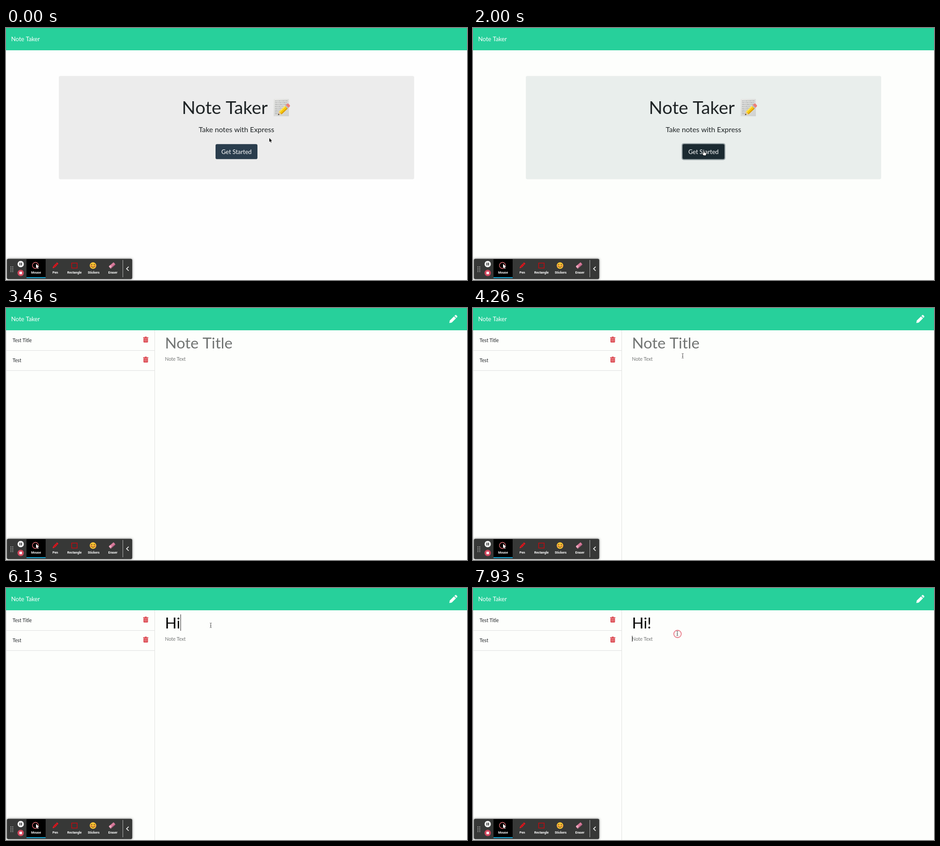
Write an HTML page with a canvas that moves like this. It is 1012x554 px and loops after 8000 ms.

```html
<!DOCTYPE html>
<html lang="en">
<head>
<meta charset="utf-8">
<title>Note Taker</title>
<style>
html, body { margin: 0; width: 100%; height: 100%; overflow: hidden; background: #fdfefc; }
canvas { display: block; }
</style>
</head>
<body>
<canvas id="stage" width="1012" height="554"></canvas>
<script>
const ctx = document.getElementById('stage').getContext('2d');
const LOOP = 8000;
const SCALE = 1012 / 1440; // page is laid out 1440 px wide
const LATO = 'Lato, sans-serif';
const TIME = { sharp: 200, hover: 400, open: 2200, focusTitle: 4900, focusText: 7900 };
const CLICKS = [
  { at: 476, x: 507.5, y: 271 },
  { at: 4848, x: 450, y: 82 },
  { at: 7866, x: 449, y: 101 }
];
const TYPED = [[5560, 'H'], [5850, 'Hi'], [6420, 'Hi!']];

const ease = p => { p = Math.max(0, Math.min(1, p)); return p * p * (3 - 2 * p); };
const mix = (a, b, p) => a + (b - a) * p;

function rect(x, y, w, h, color) {
  ctx.fillStyle = color;
  ctx.fillRect(x, y, w, h);
}
function box(x, y, w, h, r, color) {
  ctx.beginPath();
  ctx.roundRect(x, y, w, h, r);
  ctx.fillStyle = color;
  ctx.fill();
}
function disc(x, y, r, color) {
  ctx.beginPath();
  ctx.arc(x, y, r, 0, Math.PI * 2);
  ctx.fillStyle = color;
  ctx.fill();
}
function ring(x, y, r, color, width) {
  ctx.beginPath();
  ctx.arc(x, y, r, 0, Math.PI * 2);
  ctx.strokeStyle = color;
  ctx.lineWidth = width;
  ctx.stroke();
}
function shape(path, fill, stroke, width = 1) {
  const p = new Path2D(path);
  if (stroke) {
    ctx.strokeStyle = stroke;
    ctx.lineWidth = width;
    ctx.stroke(p);
  }
  if (fill) {
    ctx.fillStyle = fill;
    ctx.fill(p);
  }
}
function label(text, x, y, size, color, align = 'left', font = LATO) {
  ctx.font = `${size}px ${font}`;
  ctx.textAlign = align;
  ctx.fillStyle = color;
  ctx.fillText(text, x, y);
}
function at(x, y, draw, angle = 0) {
  ctx.save();
  ctx.translate(x, y);
  ctx.rotate(angle);
  draw();
  ctx.restore();
}

function memo() {
  const paper = ctx.createLinearGradient(588, 156, 621, 194);
  paper.addColorStop(0, '#e6e6e4');
  paper.addColorStop(1, '#cfd1d0');
  rect(587.5, 156, 33.5, 38, paper);
  ctx.strokeStyle = '#8b8d8d';
  ctx.lineWidth = 0.9;
  for (let i = 0; i < 8; i++) {
    ctx.setLineDash([4 + i % 3, 1, 2, 1]);
    ctx.beginPath();
    ctx.moveTo(590.5, 160.5 + i * 4);
    ctx.lineTo(i < 3 ? 618 : 615 - i * 2, 160 + i * 4);
    ctx.stroke();
  }
  ctx.setLineDash([]);
  at(597, 191.5, () => {
    shape('M0 0L7 -4.2L7 4.2Z', '#e8c69a');
    shape('M0 0L3 -1.8L3 1.8Z', '#333');
    rect(7, -4.2, 19, 8.4, '#f6c90e');
    rect(7, -4.2, 19, 2.5, '#ffe45c');
    rect(7, 2, 19, 2.2, '#d99a08');
    rect(25, -4.2, 3, 8.4, '#b9bcbd');
    box(28, -4.2, 6, 8.4, [0, 3, 3, 0], '#ee7f78');
  }, -0.76);
}

function header() {
  rect(0, 0, 1012, 49, '#27d09b');
  label('Note Taker', 11.25, 29, 18.75 * SCALE, '#fff');
}

function homePage(t) {
  const sharp = t >= TIME.sharp;
  const hover = t >= TIME.hover;
  box(116, 105.5, 780, 227, 3.4, sharp ? '#e9eeec' : '#ececec');
  label('Note Taker', 386, 188.6, 56 * SCALE, '#1f2426');
  memo();
  label('Take notes with Express', 506, 229.3, 22.5 * SCALE, '#1f2426', 'center');
  if (t >= 860) box(457.8, 253.2, 96.4, 37.3, 4.8, '#9ba6a9');
  box(460, 255.3, 92, 33, 3.4, hover ? '#1b2a31' : '#2a3d4d');
  label('Get Started', 506, 276.6, 18.75 * SCALE, '#fff', 'center');
}

function trash(y) {
  at(301, y, () => {
    rect(0, 1.4, 11.5, 1.7, '#d8353f');
    rect(3.6, 0, 4.3, 1.6, '#d8353f');
    box(0.9, 3.7, 9.7, 9, [0, 0, 1.3, 1.3], '#d8353f');
    for (const x of [2.9, 5.35, 7.8]) rect(x, 5, 0.8, 6.2, '#f9d9d8');
  });
}

function caret(x, y, h, since, t) {
  if ((t - since) % 1000 < 500) rect(x, y, 1, h, '#222');
}

function notesPage(t) {
  shape('M973.3 32.3L974.2 27.6L983.4 18.4L987.8 22.8L978.6 32L973.3 32.9Z', '#fff');
  shape('M984.5 17.3L986.2 15.6Q987.2 14.8 988.2 15.6L990.4 17.8Q991.4 18.9 990.4 20L988.8 21.7Z', '#fff');
  const line = '#dfe0df';
  rect(0, 49, 1, 505, line);
  rect(326, 49, 1, 505, line);
  ['Test Title', 'Test'].forEach((title, i) => {
    const y = 49 + i * 44;
    label(title, 14.6, y + 26, 15 * SCALE, '#1c2023');
    trash(y + 14);
    rect(0, y + 44, 327, 1, line);
  });

  const last = TYPED.filter(([start]) => t >= start).pop();
  const title = last ? last[1] : '';
  label(title || 'Note Title', 349, 88.7, 48 * SCALE, title ? '#000' : '#717473');
  const titleWidth = title ? ctx.measureText(title).width : 0;
  label('Note Text', 349, 115.8, 15 * SCALE, '#717473');
  if (t >= TIME.focusText) caret(349, 105, 13, TIME.focusText, t);
  else if (t >= TIME.focusTitle) {
    caret(349 + Math.round(titleWidth), 58, 36, last ? last[0] : TIME.focusTitle, t);
  }
}

const ARROW = 'M0 0L0 8.6L2 6.8L3.4 9.8L4.8 9.2L3.4 6.2L6 6Z';
function arrow(x, y) {
  at(x, y, () => shape(ARROW, '#111', '#fff', 1));
}
function hand(x, y) {
  at(x, y, () => shape(
    'M-1.5 -4Q-.6 -5 .2 -4L.2 -1.3L3.4 -.6Q4.4 0 4.1 1.5L3.4 5L-1.2 5L-4 1.2Q-3.6 -.2 -1.5 1Z',
    '#fff', '#111', 1.5));
}
function beam(x, y) {
  at(x, y, () => shape('M-2 -5L-.6 -5L0 -4.3L.6 -5L2 -5M0 -4.3L0 4.3M-2 5L-.6 5L0 4.3L.6 5L2 5M-1.2 1L1.2 1',
    null, '#444', 0.9));
}

function pointer(t) {
  if (t < TIME.open) {
    const p = ease((t - 30) / 400);
    const x = mix(578, 506, p), y = mix(242, 275, p);
    (t < TIME.hover ? arrow : hand)(t < TIME.hover ? x : 507.5, y);
  } else if (t >= 3700) {
    const p = ease((t - 3700) / 800);
    const down = ease((t - 7150) / 450);
    beam(mix(500, 449.5, p) - down, mix(190, 82, p) + 18 * down);
  }
}

function clickRings(t) {
  for (const c of CLICKS) {
    const age = t - c.at;
    if (age < 0 || age > 290) continue;
    const r = age / 8;
    const fade = Math.min(1, (290 - age) / 90);
    ring(c.x, c.y, Math.min(r, 25), `rgba(222,50,72,${0.72 * fade})`, Math.min(2.7, 0.9 + r / 12));
  }
}

function toolbar() {
  ctx.save();
  ctx.shadowColor = 'rgba(0,0,0,.55)';
  ctx.shadowBlur = 5;
  box(2, 507.5, 275, 44.5, 3, '#373837');
  ctx.restore();
  rect(45, 508, 42, 40, '#000');
  rect(45, 547.8, 42, 2, '#16afe0');

  for (let i = 0; i < 8; i++) disc(10.8 + i % 2 * 4, 525 + (i >> 1) * 3.5, 0.9, '#c8c8c8');
  disc(32.3, 519, 7, '#f2f2f2');
  rect(29.7, 516, 1.7, 6, '#222');
  rect(33.2, 516, 1.7, 6, '#222');
  disc(32.3, 538.5, 7, '#d0465c');
  box(29.5, 535.7, 5.6, 5.6, 0.8, '#fff');

  ring(64.7, 522, 6.7, '#dc6a70', 1.4);
  at(66, 518.4, () => {
    ctx.scale(1.1, 1.1);
    shape(ARROW, '#fff', '#000', 0.8);
  });
  at(102.3, 528.3, () => {
    shape('M0 0L4 -2.3L4 2.3Z', '#ee1c24');
    rect(4.6, -2.3, 8, 4.6, '#e8151d');
    rect(5, -0.4, 7, 0.8, '#8e1317');
    box(13.2, -2.3, 3, 4.6, 1, '#e8151d');
  }, -0.8);
  ctx.strokeStyle = '#c5090f';
  ctx.lineWidth = 1.5;
  ctx.strokeRect(144.2, 516.7, 12, 11);

  disc(191, 522.3, 7.2, '#f8c332');
  disc(186.8, 523.5, 1.9, '#ef8a51');
  disc(195.2, 523.5, 1.9, '#ef8a51');
  shape('M186.6 521Q188 518.6 189.5 521M192.5 521Q194 518.6 195.4 521M187.7 524.2Q191 528.2 194.3 524.2', null, '#6b3e12', 1.1);

  at(233, 522, () => {
    box(-7, -3.3, 14, 6.6, 1.2, '#d8799a');
    box(-7, -3.3, 4.6, 6.6, 1, '#eea9bf');
    rect(-6, 1.8, 12.5, 1.5, '#a8597a');
  }, -0.72);

  const names = ['Mouse', 'Pen', 'Rectangle', 'Stickers', 'Eraser'];
  names.forEach((name, i) => {
    ctx.font = 'bold 7px Roboto, sans-serif';
    ctx.textAlign = 'center';
    ctx.fillStyle = '#fff';
    ctx.fillText(name, 66 + i * 42.15, 540.4);
  });
  rect(256, 510, 1, 38, '#b5b5b5');
  shape('M269.3 524.7L264.7 529.2L269.3 533.7', null, '#fff', 1.6);
}

function draw(t) {
  rect(0, 0, 1012, 554, t < TIME.sharp ? '#fefefe' : '#fdfefc');
  header();
  (t < TIME.open ? homePage : notesPage)(t);
  pointer(t);
  clickRings(t);
  toolbar();
}

const start = performance.now();
function tick() {
  draw((performance.now() - start) % LOOP);
  requestAnimationFrame(tick);
}
tick();
</script>
</body>
</html>
```
